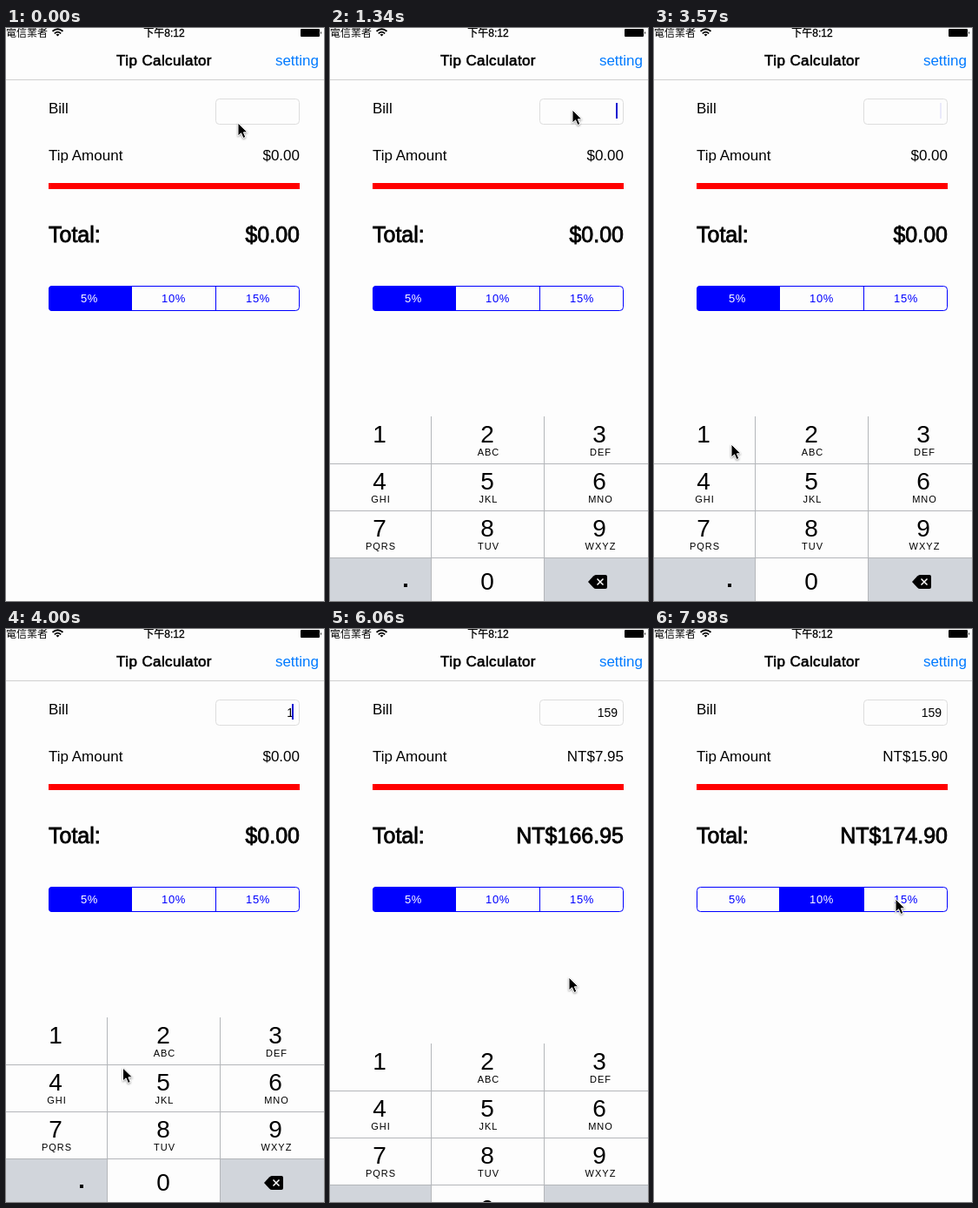
These frames come from a looping animation (366x658 px, 8000 ms). An HTML page:

```html
<!DOCTYPE html>
<html>
<head>
<meta charset="utf-8">
<style>
html, body { margin: 0; width: 100%; height: 100%; overflow: hidden; background: #fdfdfd; }
svg { display: block; width: 366px; height: 658px; font: 17px "Liberation Sans", "Noto Sans CJK TC", "Noto Sans CJK", sans-serif; }
.mid { text-anchor: middle; }
.end { text-anchor: end; }
.medium { stroke: #000; stroke-width: .6px; }
.big { font-size: 25px; stroke-width: .8px; }
.status { font-size: 12px; }
.seg { font-size: 13px; letter-spacing: .6px; }
.digit { font-size: 28px; }
.letters { font-size: 11px; letter-spacing: 1px; }
</style>
</head>
<body>
<svg viewBox="0 0 366 658">
  <rect width="366" height="658" fill="#fdfdfd"/>
  <text class="status" y="10">電信業者</text>
  <g fill="none" stroke="#000" stroke-width="1.8">
    <path d="M53.5 3.8Q59.5-1.4 65.5 3.8M55.8 6.3Q59.5 3 63.2 6.3"/>
    <path d="M57.5 7.4Q59.5 6 61.5 7.4L59.5 9.6Z" fill="#000" stroke="none"/>
  </g>
  <text class="status mid" x="182" y="10" stroke="#000" stroke-width=".3">下午8:12</text>
  <path d="M340 1h20q1 0 1 1v7q0 1-1 1h-20q-1 0-1-1v-7q0-1 1-1zM362 4q2 1.500 0 3z"/>
  <text class="mid medium" x="182" y="43" letter-spacing=".4">Tip Calculator</text>
  <text class="end" x="360" y="43" fill="#007aff">setting</text>
  <path d="M0 59.500H366" stroke="#d0d0d0"/>

  <text x="49" y="98">Bill</text>
  <rect x="241.500" y="81.500" width="96" height="29" rx="4" fill="#fdfdfd" stroke="#ddd"/>
  <text id="bill" class="end" x="331" y="101" font-size="14"></text>
  <rect id="caret" x="329" y="86" width="2" height="18" fill="#1010d0"/>
  <text x="49" y="152">Tip Amount</text>
  <text id="tip" class="end" x="338" y="152"></text>
  <rect x="49" y="178" width="289" height="7" fill="#f00"/>
  <text class="medium big" x="49" y="246">Total:</text>
  <text id="total" class="end medium big" x="338" y="246"></text>

  <clipPath id="round"><rect x="49" y="296" width="289" height="29" rx="4"/></clipPath>
  <rect id="chosen" y="296" width="96" height="29" fill="#00f" clip-path="none"/>
  <g id="segments"></g>
  <rect x="49.500" y="296.500" width="288" height="28" rx="4" fill="none" stroke="#00f"/>
  <path d="M144.500 296V325M241.500 296V325" stroke="#00f"/>

  <g id="keyboard"></g>
  <circle id="ring" r="10" fill="none" stroke="#222"/>
  <path id="arrow" d="M0 0V15L3.600 11.800L6 17.500L8.800 16.300L6.400 10.800H11Z" stroke="#fff" style="filter: drop-shadow(0 1px 1px #0006)"/>
</svg>
<script>
const $ = id => document.getElementById(id);
const LOOP = 8000, TICK = 147.7;

// Segmented control
const rates = [5, 10, 15];
$('segments').innerHTML = rates.map((r, i) =>
  `<text class="seg mid" x="${96 + 97 * i}" y="315">${r}%</text>`).join('');
const segments = [...$('segments').children];
$('chosen').outerHTML = '<g clip-path="url(#round)"><rect id="chosen" y="296" width="97" height="29" fill="#00f"/></g>';

// Keyboard
const colX = [0, 117, 247, 366], centers = [57, 181, 310];
const names = ['', 'ABC', 'DEF', 'GHI', 'JKL', 'MNO', 'PQRS', 'TUV', 'WXYZ'];
const GRAY = '#d1d5db';
const cell = (col, row, fill, id = '') =>
  `<rect id="${id}" x="${colX[col]}" y="${446 + 54 * row}" width="${colX[col + 1] - colX[col]}" height="54" fill="${fill}"/>`;
let keys = '<rect y="446" width="366" height="212" fill="#fdfdfd"/>';
names.forEach((name, i) => {
  const col = i % 3, row = Math.floor(i / 3), x = centers[col], y = 476 + 54 * row;
  keys += cell(col, row, 'none', 'key' + (i + 1)) +
    `<text class="digit mid" x="${x}" y="${y}">${i + 1}</text>
     <text class="letters mid" x="${x + 1.5}" y="${y + 15}">${name}</text>`;
});
keys += cell(0, 3, GRAY) + cell(2, 3, GRAY) + `
  <path d="M0 500.500H366M0 554.500H366M0 608.500H366M116.500 446V658M246.500 446V658" stroke="#b4b6ba"/>
  <rect x="85" y="638" width="4" height="4"/>
  <text class="digit mid" x="181" y="645">0</text>
  <path d="M297 636L303 629.500Q304.500 628 306 628H317Q319 628 319 630V642Q319 644 317 644H306Q304.500 644 303 642.500Z"/>
  <path d="M307.500 632.500l7 7m0-7l-7 7" stroke="#fff" stroke-width="1.500"/>`;
$('keyboard').innerHTML = keys;

// Keyframes: tick, then values
const pointer = [
  [0, 267, 109], [2, 279, 94], [9, 279, 94], [13, 112, 495], [14, 103, 484], [17, 89, 478],
  [26, 89, 478], [28, 180, 530], [30, 326, 578], [32, 326, 578], [35, 275, 400], [42, 275, 400],
  [45, 216, 328], [47, 190, 312], [52, 190, 312], [54, 278, 310]];
const slide = [[5, 212], [6, 150], [7, 61], [8, 12], [9, 0], [40, 0], [41, 30], [42, 130], [43, 195], [44, 212]];
const taps = [5, 25, 28, 32, 40, 50];

function at(track, n) {
  const next = track.findIndex(k => k[0] > n);
  if (next < 0) return track[track.length - 1].slice(1);
  if (next === 0) return track[0].slice(1);
  const a = track[next - 1], b = track[next], p = (n - a[0]) / (b[0] - a[0]);
  return a.slice(1).map((v, i) => v + (b[i + 1] - v) * p);
}

function caretAlpha(n) {
  if (n < 6 || n > 40) return 0;
  const since = n < 26 ? 6 : n < 28 ? 26 : n < 33 ? 28 : 33;
  const phase = (n - since) % 7;
  return phase < 4 ? 1 : phase > 4 ? 0 : n < 26 ? .08 : .5;
}

function draw(n) {
  const [x, y] = at(pointer, n);
  $('arrow').setAttribute('transform', `translate(${x} ${y})`);
  $('ring').setAttribute('transform', `translate(${x + 2} ${y - .5})`);
  $('ring').style.opacity = taps.includes(n) ? 1 : 0;
  $('keyboard').setAttribute('transform', `translate(0 ${at(slide, n)[0]})`);
  $('key1').setAttribute('fill', n === 25 ? GRAY : 'none');
  $('key5').setAttribute('fill', n === 28 ? GRAY : 'none');

  const typed = n < 26 ? 0 : n < 28 ? 1 : n < 33 ? 2 : 3;
  $('bill').textContent = '159'.slice(0, typed);
  $('caret').style.opacity = caretAlpha(n);

  const choice = n < 51 ? 0 : 1;
  const sum = n < 41 ? 0 : 159, tip = sum * rates[choice] / 100;
  const money = v => (sum ? 'NT$' : '$') + v.toFixed(2);
  $('tip').textContent = money(tip);
  $('total').textContent = money(sum + tip);
  $('chosen').setAttribute('x', 48 + 96.5 * choice);
  segments.forEach((s, i) => s.setAttribute('fill', i === choice ? '#fff' : '#00f'));
}

// Labels sit above the selected fill
$('segments').before($('chosen').parentNode);

function frame() {
  draw(Math.floor(performance.now() % LOOP / TICK));
  requestAnimationFrame(frame);
}
frame();
</script>
</body>
</html>
```
